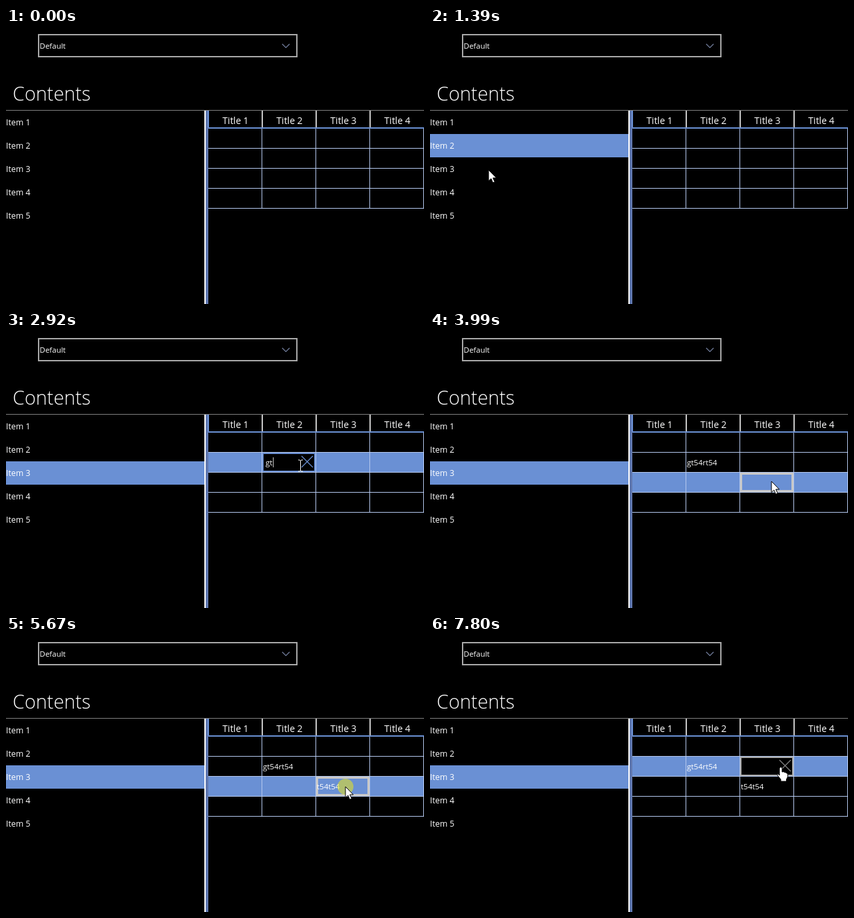
These frames come from a looping animation (628x414 px, 8 s). An HTML page:

```html
<!DOCTYPE html>
<html lang="en">
<head>
<meta charset="utf-8">
<title>Table editing</title>
<style>
  html, body { margin: 0; width: 100%; height: 100%; overflow: hidden; background: #000; }
  svg { display: block; width: 628px; height: 414px; }
  text { font: 11.5px "Open Sans", "Noto Sans", sans-serif; fill: #fff; }
  rect { shape-rendering: crispEdges; }
  .item { font-size: 12.4px; }
  .head { font-size: 14px; text-anchor: middle; }
  .big { font-size: 28.8px; font-weight: 300; }
</style>
</head>
<body>
<svg viewBox="0 0 628 414">
  <g id="marks"></g>
  <g id="base"></g>
  <g id="live"></g>
</svg>
<script>
const LOOP = 8000, KEY = 70, PRESS = 200, EDIT_LEAD = 270;
const BLUE = '#6a90d4', GRID = '#b4c8ee', LIGHT = '#c8c8c8', GRAY = '#a9a9a9';
const LIST_TOP = 124, ITEM = 35, LEFT = 304, TOP = 151, COL = 81, ROW = 30;

const $ = id => document.getElementById(id);
const rect = (x, y, w, h, fill) => `<rect x="${x}" y="${y}" width="${w}" height="${h}" fill="${fill}"/>`;
const text = (x, y, s, cls = '') => `<text x="${x}" y="${y}" class="${cls}">${s}</text>`;
const line = (d, color) => `<path d="${d}" fill="none" stroke="${color}" stroke-width="1.2"/>`;
const frame = (x, y, w, h, b, color, fill) => rect(x, y, w, h, color) + rect(x + b, y + b, w - 2 * b, h - 2 * b, fill);
const ruler = document.createElement('canvas').getContext('2d');
ruler.font = '11.5px "Open Sans", "Noto Sans", sans-serif';

// A click may be followed by typing from `key` on; each "-" is a pause of one key
const steps = [
  { at: 0, x: 362, y: 414 },
  { at: 1040, x: 88, y: 188 },
  { at: 1460, x: 88, y: 214 },
  { at: 2060, x: 442, y: 200, key: 2580, keys: 'gt----54rt54' },
  { at: 3560, x: 513, y: 224, key: 4300, keys: 't54t54' },
  { at: 5040, x: 536, y: 257 },
  { at: 5600, x: 510, y: 226 },
  { at: 6140, x: 499, y: 189, key: 6970, keys: 't54' },
  { at: 7590, x: 527, y: 198, clear: true }
];
for (const s of steps) {
  if (s.y >= 414) continue;
  if (s.x < LEFT) s.item = Math.floor((s.y - LIST_TOP) / ITEM);
  else {
    s.cellX = LEFT + COL * Math.floor((s.x - LEFT) / COL);
    s.cellY = TOP + ROW * Math.floor((s.y - TOP) / ROW);
  }
}

function drawBase() {
  let s = frame(48, 9, 390, 35, 2, GRAY, '#000')
    + line('M415 24L420.5 29.5L426 24', '#7480a0')
    + text(50.5, 31, 'Default')
    + text(10, 109, 'Contents', 'big')
    + rect(0, 123, 628, 1, '#808080')
    + rect(298, 124, 2, 290, '#fff') + rect(300, 124, 4, 290, '#6078b0');
  for (let i = 0; i < 5; i++) s += text(0, LIST_TOP + 22 + ITEM * i, `Item ${i + 1}`, 'item');
  for (let i = 0; i < 4; i++) {
    const x = LEFT + COL * i;
    s += rect(x - 1, 124, 2, 25, i ? LIGHT : BLUE)
      + text(x + 41, 144, `Title ${i + 1}`, 'head')
      + rect(x + COL - 1, TOP, 1, 4 * ROW - 1, GRID)
      + rect(LEFT, TOP + ROW * (i + 1) - 1, 324, 1, GRID);
  }
  return s + rect(LEFT, 149, 324, 2, BLUE);
}

// Leaves after the previous press, earlier for longer ways, and slows down on arrival
function pointerAt(t) {
  const i = steps.findIndex(s => s.at > t);
  if (i < 0) return steps.at(-1);
  const a = steps[i - 1], b = steps[i];
  const travel = 150 + 1.8 * Math.hypot(b.x - a.x, b.y - a.y);
  const leave = Math.max(a.at + PRESS, b.at - travel);
  const u = Math.max(0, (t - leave) / (b.at - leave)), e = 1 - (1 - u) ** 3;
  return { x: a.x + (b.x - a.x) * e, y: a.y + (b.y - a.y) * e };
}

const valueAt = (step, t) =>
  step.keys.slice(0, Math.max(0, Math.floor((t - step.key) / KEY) + 1)).replaceAll('-', '');

function drawCell({ cellX: x, cellY: y }, state, value) {
  if (state === 'select') return frame(x, y, 80, 29, 3, LIGHT, BLUE) + text(x + 1, y + 19, value);
  const edit = state === 'edit', color = edit ? BLUE : GRAY;
  return frame(x, y, 80, 29, 2, color, '#000')
    + text(x + 5, y + 19, value)
    + line(`M${x + 59} ${y + 5}l17 17m0-17l-17 17`, edit ? BLUE : '#858585')
    + (edit ? rect(Math.round(x + 5.5 + ruler.measureText(value).width), y + 7, 1, 15, LIGHT) : '');
}

const shapes = {
  arrow: 'M0 0V16.5L3.8 13L6.5 19.2L9.3 18L6.6 12H11.7Z',
  hand: 'M-2 0Q0-3 2 0V6L4 5.5L6 6.5L8 7L10.5 9V13L8.5 17V20H0V17L-5 11Q-6 8-3.5 9L-2 11Z',
  beam: 'M-3-8H-1L.5-7L2-8H4M.5-7V8M-3 9H-1L.5 8L2 9H4'
};

function drawPointer({ x, y }, kind, pressed) {
  const paint = kind === 'beam' ? 'fill="none" stroke="#fff"' : 'fill="#fff" stroke="#000"';
  return (pressed ? `<circle cx="${x}" cy="${y}" r="12" fill="rgba(223,224,44,.6)"/>` : '')
    + `<path transform="translate(${x} ${y})" d="${shapes[kind]}" ${paint}/>`;
}

function draw(now) {
  const t = now % LOOP;
  const done = steps.filter(s => s.at <= t), last = done.at(-1);
  const item = done.findLast(s => s.item >= 0);
  const cell = last.cellX ? last : null;
  const pressed = last.at > 0 && t < last.at + PRESS;
  const cleared = last.clear && !pressed;
  const state = last.clear ? 'blur' : last.keys && t >= last.key - EDIT_LEAD ? 'edit' : 'select';

  const typedIn = c => done.findLast(s => s.keys && s.cellX === c.cellX && s.cellY === c.cellY);
  const owner = cell && typedIn(cell);
  const value = owner && !cleared ? valueAt(owner, t) : '';

  $('marks').innerHTML = (item ? rect(0, LIST_TOP + ITEM * item.item, 298, ITEM, BLUE) : '')
    + (cell ? rect(LEFT, cell.cellY, 324, ROW - 1, BLUE) : '');

  let s = '';
  for (const d of done)
    if (d.keys && d !== owner) s += text(d.cellX + 1, d.cellY + 19, valueAt(d, t));
  if (cell) s += drawCell(cell, state, value);

  const p = pointerAt(t);
  const overX = cell && p.x > cell.cellX + 59;
  const inside = cell && p.x > cell.cellX && p.x < cell.cellX + COL && p.y < cell.cellY + ROW;
  const kind = state === 'select' || !inside ? 'arrow' : overX ? 'hand' : 'beam';
  if (t >= 200) s += drawPointer(p, kind, pressed);
  $('live').innerHTML = s;
}

$('base').innerHTML = drawBase();
const start = performance.now();
function tick() {
  draw(performance.now() - start);
  requestAnimationFrame(tick);
}
tick();
</script>
</body>
</html>
```
